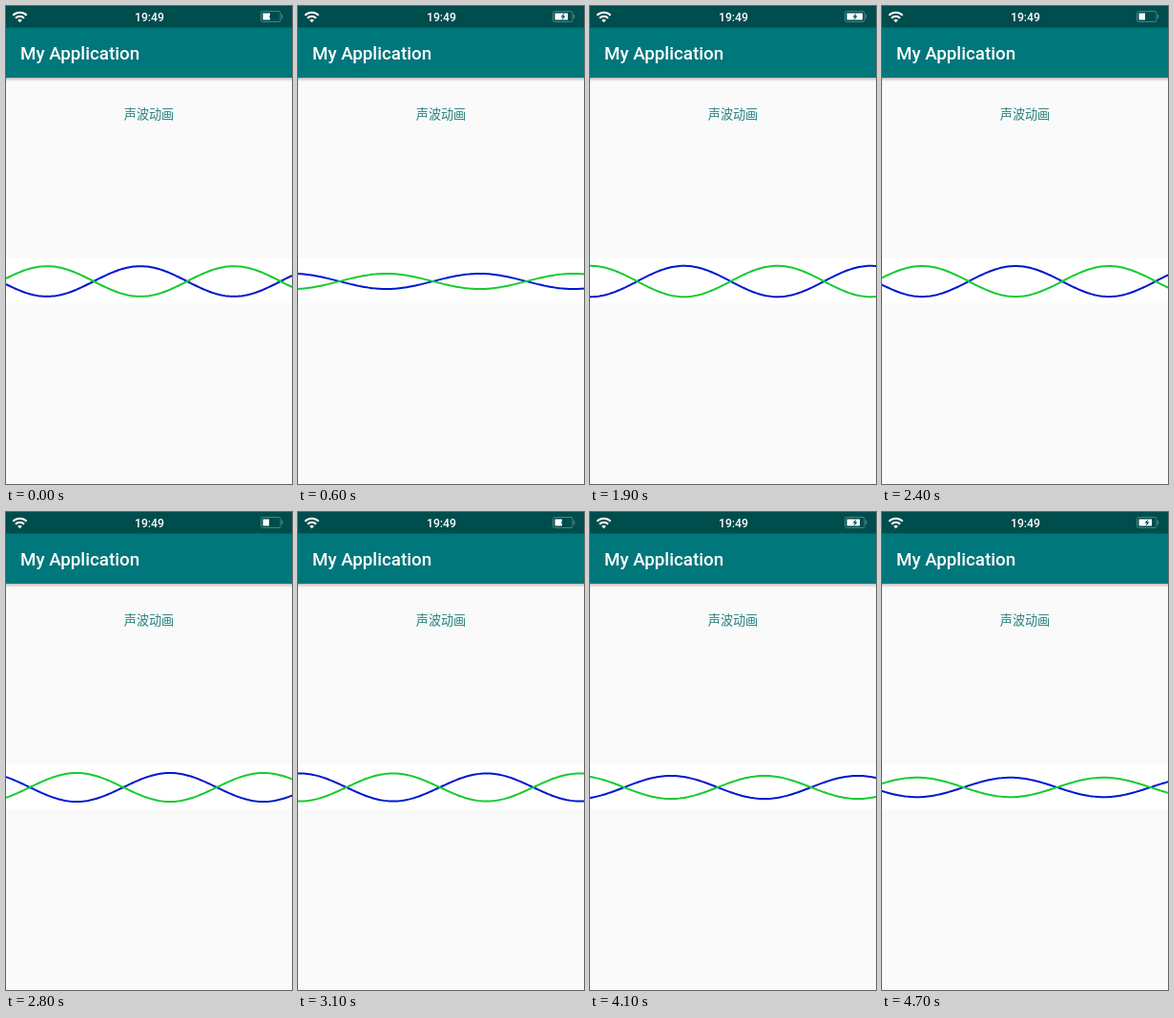
These frames come from a looping animation (300 px wide and 500 px high, 4800 ms). An HTML page:

```html
<!DOCTYPE html>
<html lang="zh-CN">
<head>
<meta charset="utf-8">
<title>声波动画</title>
<style>
  html, body { margin: 0; width: 100%; height: 100%; overflow: hidden; background: #fafafa; }
  svg { display: block; }
  text { font-family: Roboto, sans-serif; font-weight: 500; fill: #fff; }
  .label { font: 400 13.125px "Noto Sans CJK SC", "Noto Sans CJK", sans-serif; fill: #26807e; }
  .wave { fill: none; stroke-width: 2; }
</style>
</head>
<body>
<svg width="300" height="500" viewBox="0 0 300 500">
  <defs>
    <linearGradient id="shade" x2="0" y2="1">
      <stop stop-color="#000" stop-opacity=".24"/>
      <stop offset="1" stop-color="#000" stop-opacity="0"/>
    </linearGradient>
  </defs>

  <rect y="75" width="300" height="4" fill="url(#shade)"/>
  <rect y="22" width="300" height="53" fill="#00777b"/>
  <rect width="300" height="22.5" fill="#004d4e"/>

  <g fill="none" stroke="#fff" stroke-width="2">
    <path d="M7.3 9.7a10.3 10.3 0 0 1 14.4 0M10 12.7a6.4 6.4 0 0 1 9 0"/>
    <path d="M14.5 17.3l-2.3-2.4a3.3 3.3 0 0 1 4.6 0z" fill="#fff" stroke="none"/>
  </g>
  <text x="150.5" y="16" font-size="12.2" text-anchor="middle">19:49</text>

  <rect x="267.5" y="5.5" width="20.5" height="11" rx="2" fill="none" stroke="#4d8283"/>
  <rect x="289" y="9" width="1.2" height="4" fill="#4d8283"/>
  <rect id="charge" x="269.5" y="7.5" height="7" fill="#fff"/>
  <path d="M279.2 7.5l-3.7 4h2.2l-.9 3.2 3.8-4.1h-2.3z" fill="#004d4e"/>

  <text x="15" y="56" font-size="18.75">My Application</text>
  <text class="label" x="150" y="117.6" text-anchor="middle">声波动画</text>

  <rect y="264" width="300" height="47" fill="#fff"/>
  <path id="blue" class="wave" stroke="#0018ce"/>
  <path id="green" class="wave" stroke="#16cb30"/>
</svg>
<script>
  const LOOP = 4800, STEP = 100, MID = 288, LENGTH = 196;
  const $ = id => document.getElementById(id);

  // step, crest position, amplitude
  const keys = [
    [0, 43, 15.8], [6, 92.5, 8], [12, 140, 13.3], [13, 148.5, 14],
    [18, 188, 15.2], [19, 196.5, 16.2], [24, 238, 16], [28, 270, 15],
    [35, 330, 14], [36, 338, 12.4], [42, 387, 12], [47, 428.5, 10.2]
  ];
  const chargeWidths = [7.5, 13.5, 16.5, 6.5];

  function poseAt(step) {
    const i = Math.max(1, keys.findIndex(k => k[0] >= step));
    const from = keys[i - 1], to = keys[i];
    const f = (step - from[0]) / (to[0] - from[0]);
    return [1, 2].map(j => from[j] + (to[j] - from[j]) * f);
  }

  function wavePath(crest, amp) {
    let d = "";
    for (let x = -2; x <= 302; x += 2) {
      const y = MID - amp * Math.cos(2 * Math.PI * (x - crest) / LENGTH);
      d += (d ? "L" : "M") + x + " " + y.toFixed(2);
    }
    return d;
  }

  function draw(now) {
    const step = Math.floor(now % LOOP / STEP);
    const [crest, amp] = poseAt(step);
    $("green").setAttribute("d", wavePath(crest, amp));
    $("blue").setAttribute("d", wavePath(crest, -amp));
    $("charge").setAttribute("width", chargeWidths[Math.floor((step + 6) / 9) % 4]);
  }

  const start = performance.now();
  function tick() {
    draw(performance.now() - start);
    requestAnimationFrame(tick);
  }
  tick();
</script>
</body>
</html>
```
